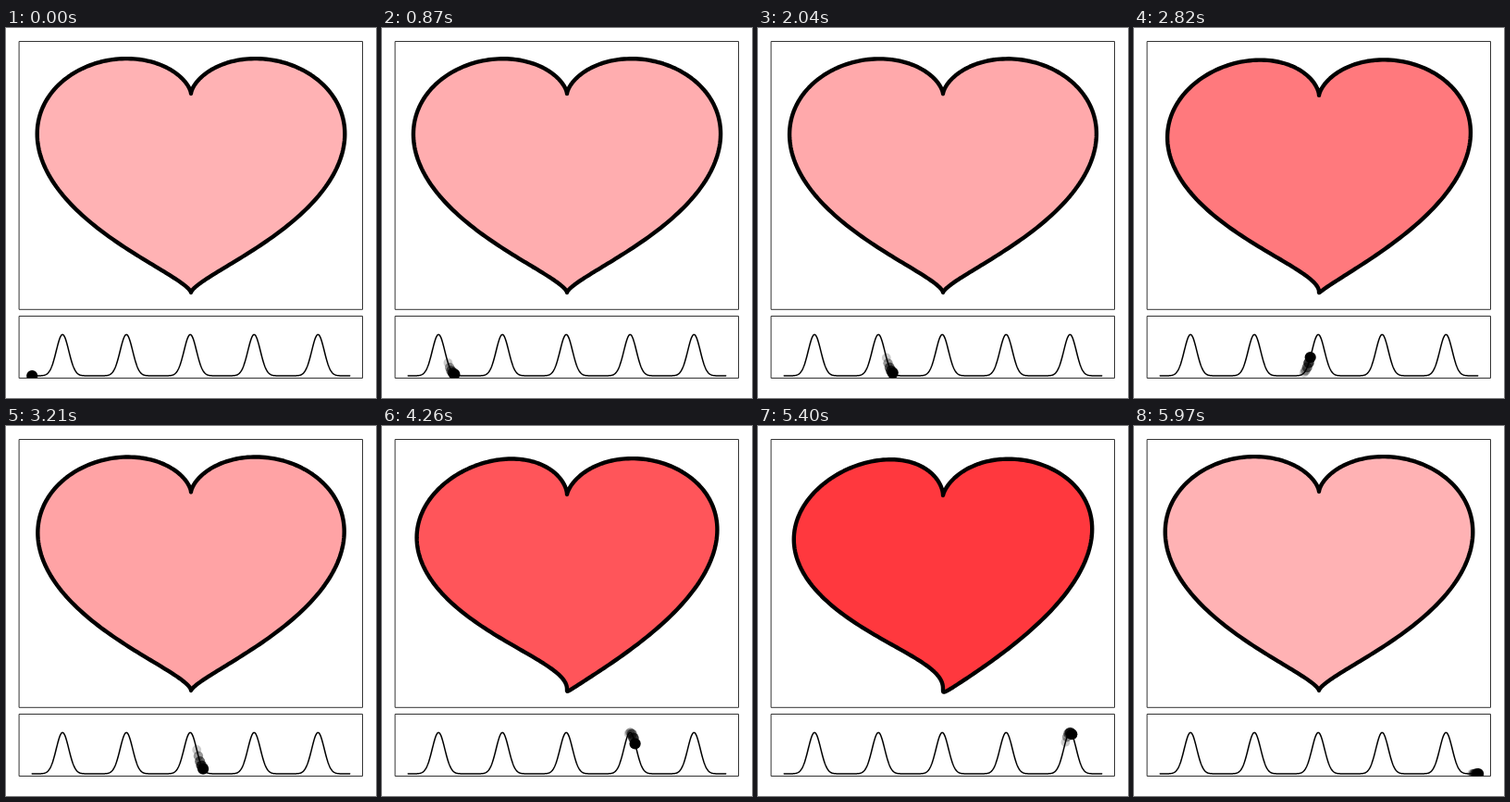
Animation, 400 px wide and 400 px high, one loop 6000 ms. Source, as an HTML page with a canvas:

```html
<!DOCTYPE html>
<html lang="en">
<head>
<meta charset="utf-8">
<title>Heartbeat</title>
<style>
  html, body { margin: 0; width: 100%; height: 100%; overflow: hidden; background: #fff; }
  canvas { display: block; width: 400px; height: 400px; }
</style>
</head>
<body>
<canvas id="stage"></canvas>
<script>
const SIZE = 400, LOOP = 6000, STEP = 30, FRAMES = LOOP / STEP;
const START = 28.2, END = 372.1, BASE = 376, PEAK = 44.6;
const BEAT_FIRST = 61.1, BEAT_GAP = 69.05, BEAT_WIDTH = 6.75;
const TRAIL = 4;
const { sin, cos, PI } = Math;

const canvas = document.getElementById('stage');
const ctx = canvas.getContext('2d');
const ratio = window.devicePixelRatio || 1;
canvas.width = canvas.height = SIZE * ratio;
ctx.scale(ratio, ratio);
ctx.lineJoin = ctx.lineCap = 'round';

// Pulse strength from 0 to 1 at a place on the trace.
function pulse(x) {
  const beat = Math.max(0, Math.min(4, Math.round((x - BEAT_FIRST) / BEAT_GAP)));
  const d = (x - BEAT_FIRST - beat * BEAT_GAP) / BEAT_WIDTH;
  return Math.exp(-d * d / 2);
}

const traceY = x => BASE - PEAK * pulse(x);
const dotX = n => START + n * (END - START) / (FRAMES - 1);

// A pulse squeezes the heart sideways, leans it over and lets it sink.
function heartPoint(t, p) {
  const s3 = sin(t) ** 3, s5 = sin(t) ** 5;
  const x = 200 + (166.3 - 5.3 * p) * s3 + 26 * p * (s5 - s3);
  const rest = 143 - 128.6 * cos(t) + 32 * cos(2 * t) + 21.1 * cos(3 * t) + 3.5 * cos(4 * t);
  const lean = 0.25 * sin(t) - 4 * sin(2 * t) + 6.1 * sin(3 * t) - 0.3 * sin(4 * t);
  const sink = 2 + 2.2 * cos(t) - 0.6 * cos(2 * t) + 0.4 * cos(3 * t);
  return [x, rest + p * (lean + sink)];
}

function drawHeart(p) {
  ctx.beginPath();
  for (let i = 0; i < 360; i++) ctx.lineTo(...heartPoint(i * PI / 180, p));
  ctx.closePath();
  ctx.fillStyle = `rgb(255,${Math.round(178 - 127 * p)},${Math.round(180 - 123 * p)})`;
  ctx.fill();
  ctx.strokeStyle = '#000';
  ctx.lineWidth = 4.4;
  ctx.stroke();
}

function drawTrace() {
  ctx.beginPath();
  for (let x = START; x <= END; x += 0.5) ctx.lineTo(x, traceY(x));
  ctx.strokeStyle = '#000';
  ctx.lineWidth = 1.5;
  ctx.stroke();
}

function drawDots(n) {
  ctx.save();
  ctx.beginPath();
  ctx.rect(14, 311, 372, 67.5);
  ctx.clip();
  for (let age = Math.min(TRAIL, n); age >= 0; age--) {
    const x = dotX(n - age);
    ctx.beginPath();
    ctx.arc(x, traceY(x), 6.1 - 0.3 * age, 0, 2 * PI);
    ctx.fillStyle = `rgba(0,0,0,${1 - 0.2 * age})`;
    ctx.fill();
  }
  ctx.restore();
}

function drawPanel(y, height) {
  ctx.strokeStyle = '#333';
  ctx.lineWidth = 1;
  ctx.strokeRect(14.5, y, 371, height);
}

function draw() {
  const n = Math.floor((performance.now() % LOOP) / STEP);
  ctx.fillStyle = '#fff';
  ctx.fillRect(0, 0, SIZE, SIZE);
  drawPanel(14.5, 289.8);
  drawPanel(311.5, 67);
  drawHeart(pulse(dotX(n)));
  drawTrace();
  drawDots(n);
  requestAnimationFrame(draw);
}

draw();
</script>
</body>
</html>
```
